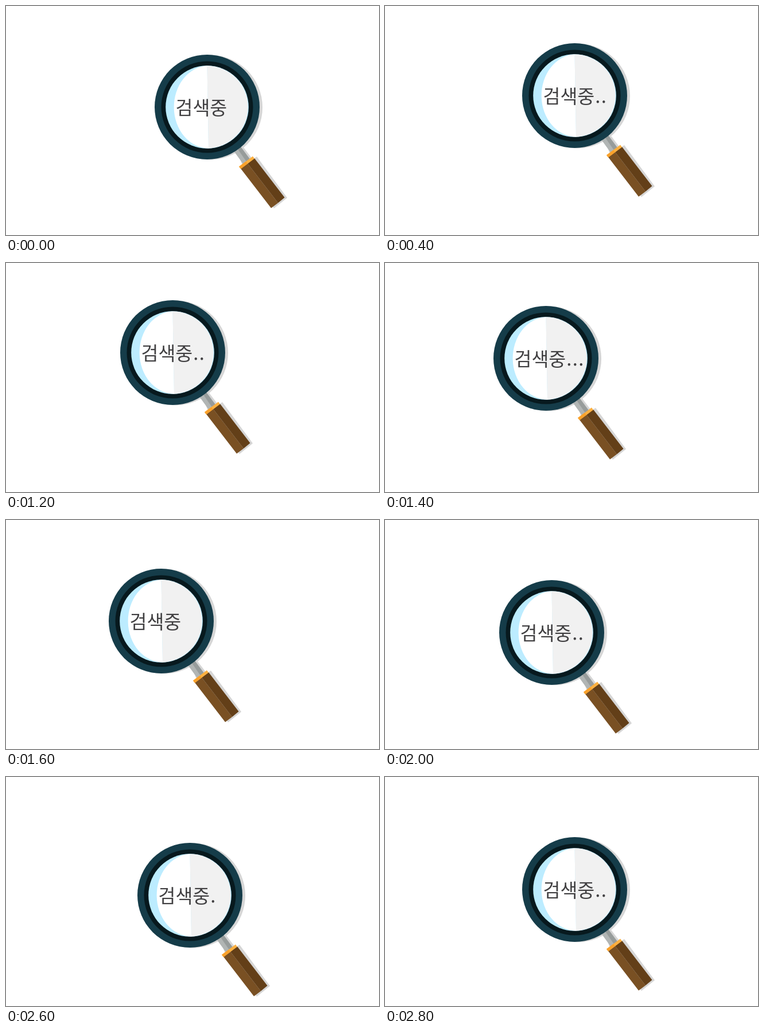
These frames come from a looping animation (650x400 px, 3 s). An HTML page:

```html
<!DOCTYPE html>
<html lang="ko">
<head>
<meta charset="utf-8">
<style>
  html, body { margin: 0; width: 100%; height: 100%; overflow: hidden; background: #fff; }
  svg { display: block; }
  text { font: 500 32.5px "Noto Sans CJK KR", "Noto Sans CJK", sans-serif; fill: #414042; }
</style>
</head>
<body>
<svg width="650" height="400" viewBox="0 0 650 400">
  <g id="magnifier">
    <g fill="#d6d6d6">
      <circle cx="355.5" cy="177" r="91.5"/>
      <path d="M403 254 414 247 430 268 437 263 490 335 467 353.5 414 284Z"/>
    </g>

    <path fill="#b1b5b4" d="M397 253.500 403 249 419.500 271.500 414 277Z"/>
    <path fill="#979c9b" d="M403 249 408.500 245 425.500 268 419.500 272.500Z"/>
    <path fill="#795023" d="M409 284 421 275 474 344 462 353Z"/>
    <path fill="#633f18" d="M421 275 433 266 485.500 334.500 474 344Z"/>
    <path fill="#fcb040" d="M406 280.500 430 262.500 433 266.500 409 284.500Z"/>
    <path fill="#f9a12b" d="M406 280.500 418 271.500 421 275.500 409 284.500Z"/>

    <circle cx="350.500" cy="176.500" r="91.500" fill="#153c49"/>
    <circle cx="350.500" cy="176.500" r="80" fill="#07191e"/>
    <circle cx="350.500" cy="176.500" r="72.300" fill="#bcecff"/>
    <path fill="#fff" d="M350.500 104.200A61 72.300 0 0 0 353 248.700Z"/>
    <path fill="#f1f1f1" d="M350.500 104.200A72.300 72.300 0 0 1 353 248.700Z"/>

    <text x="295.500" y="189.500">검색중<tspan id="dots" dx="1" letter-spacing="1.500"></tspan></text>
  </g>
</svg>
<script>
  const STEP_MS = 200, STEPS = 15, STRIDE = 10;
  const magnifier = document.getElementById("magnifier");
  const dots = document.getElementById("dots");

  // The lens follows a diamond of 16 strides, jumping home one stride early.
  function draw(now) {
    const step = Math.floor(now / STEP_MS) % STEPS;
    const x = Math.abs(step - 8) - 8;
    const y = 4 - Math.abs((step + 4) % 16 - 8) ;
    const dy = step <= 12 ? Math.abs(step - 4) - 4 : 16 - step;
    magnifier.setAttribute("transform", `translate(${x * STRIDE} ${dy * STRIDE})`);
    dots.textContent = ".".repeat(step % 4);
    requestAnimationFrame(draw);
  }
  requestAnimationFrame(draw);
</script>
</body>
</html>
```
